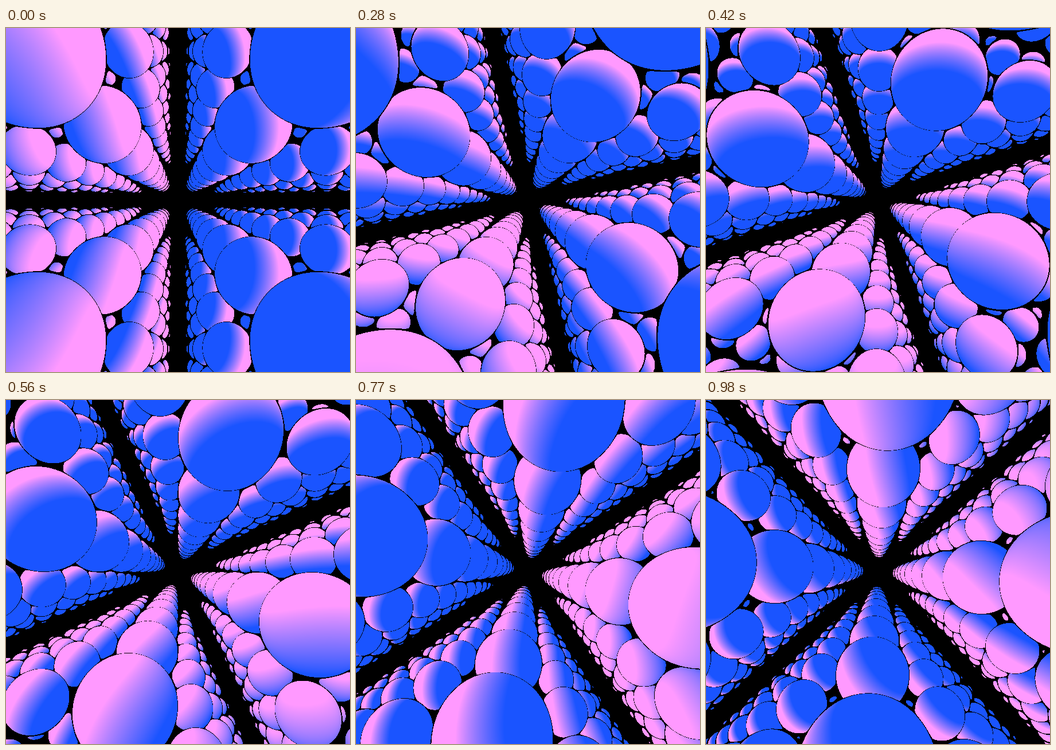
Write an HTML page with a canvas that moves like this. It is 600 by 600 pixels and loops after 1050 ms.

```html
<!DOCTYPE html>
<html lang="en">
<head>
<meta charset="utf-8">
<title>Sphere lattice</title>
<style>
  html, body { margin: 0; width: 100%; height: 100%; overflow: hidden; background: #000; }
  canvas { display: block; width: 600px; height: 600px; }
</style>
</head>
<body>
<canvas id="view" width="600" height="600"></canvas>
<script>
const SIZE = 600, HALF = 300;
const STEPS = 15, STEP_MS = 70;
const FOCAL = HALF / Math.tan(Math.PI / 6);   // 60 degree field of view
const R = 0.25, HIT = 0.001, MARCH = 50;
const ROLL = 3 * Math.PI / 180, TURN = 15 * Math.PI / 180;   // per step
const SHADE = [26, 84, 255], LIT = [255, 153, 255];
const RAMP_LOW = -0.36, RAMP_HIGH = 0.42;
const SPREAD = 0.9, DEPTH = 0.25;   // how the light fans out with the view

const ctx = document.getElementById('view').getContext('2d');
const cache = [];
const normal = [0, 0, 0];

const clamp = (v, lo, hi) => Math.max(lo, Math.min(hi, v));

// March a ray through the endless lattice; on a hit fill in the normal
function march(dx, dy, dz, z0) {
  let t = 0;
  for (let i = 0; i < MARCH; i++) {
    const x = dx * t, y = dy * t, z = z0 + dz * t;
    const cx = x - Math.floor(x) - 0.5;
    const cy = y - Math.floor(y) - 0.5;
    const cz = z - Math.floor(z + 0.5);
    const r = Math.sqrt(cx * cx + cy * cy + cz * cz);
    const gap = r - R;
    if (gap < HIT) {
      normal[0] = cx / r;
      normal[1] = cy / r;
      normal[2] = cz / r;
      return true;
    }
    t += gap;
  }
  return false;
}

function paint(data, x, y, u, v, nx, ny, nz, lx, ly) {
  const s = nx * (lx + SPREAD * u) + ny * (ly + SPREAD * v) + nz * DEPTH * (u * lx + v * ly);
  const m = clamp((s - RAMP_LOW) / (RAMP_HIGH - RAMP_LOW), 0, 1);
  const p = (y * SIZE + x) * 4;
  for (let c = 0; c < 3; c++) data[p + c] = SHADE[c] + (LIT[c] - SHADE[c]) * m;
}

function render(step) {
  const img = ctx.createImageData(SIZE, SIZE);
  const data = img.data;
  for (let i = 3; i < data.length; i += 4) data[i] = 255;

  const cos = Math.cos(step * ROLL), sin = Math.sin(step * ROLL);
  const lx = Math.cos(step * TURN), ly = -Math.sin(step * TURN);
  const z0 = step / STEPS;

  // The lattice has fourfold symmetry, so one quadrant of rays serves all
  for (let b = 0; b < HALF; b++) {
    for (let a = 0; a < HALF; a++) {
      let u = (a + 0.5) / FOCAL, v = (b + 0.5) / FOCAL;
      const len = Math.sqrt(u * u + v * v + 1);
      if (!march((u * cos - v * sin) / len, (u * sin + v * cos) / len, 1 / len, z0)) continue;

      let nx = normal[0] * cos + normal[1] * sin;
      let ny = normal[1] * cos - normal[0] * sin;
      let x = HALF + a, y = HALF + b;
      for (let turn = 0; turn < 4; turn++) {
        paint(data, x, y, u, v, nx, ny, normal[2], lx, ly);
        [x, y] = [SIZE - 1 - y, x];
        [u, v] = [-v, u];
        [nx, ny] = [-ny, nx];
      }
    }
  }
  return img;
}

for (let s = 0; s < STEPS; s++) cache.push(render(s));

const start = performance.now();
let shown = -1;
function tick() {
  const time = Math.max(0, performance.now() - start);
  const step = Math.floor(time / STEP_MS) % STEPS;
  if (step !== shown) {
    ctx.putImageData(cache[step], 0, 0);
    shown = step;
  }
  requestAnimationFrame(tick);
}
tick();
</script>
</body>
</html>
```
